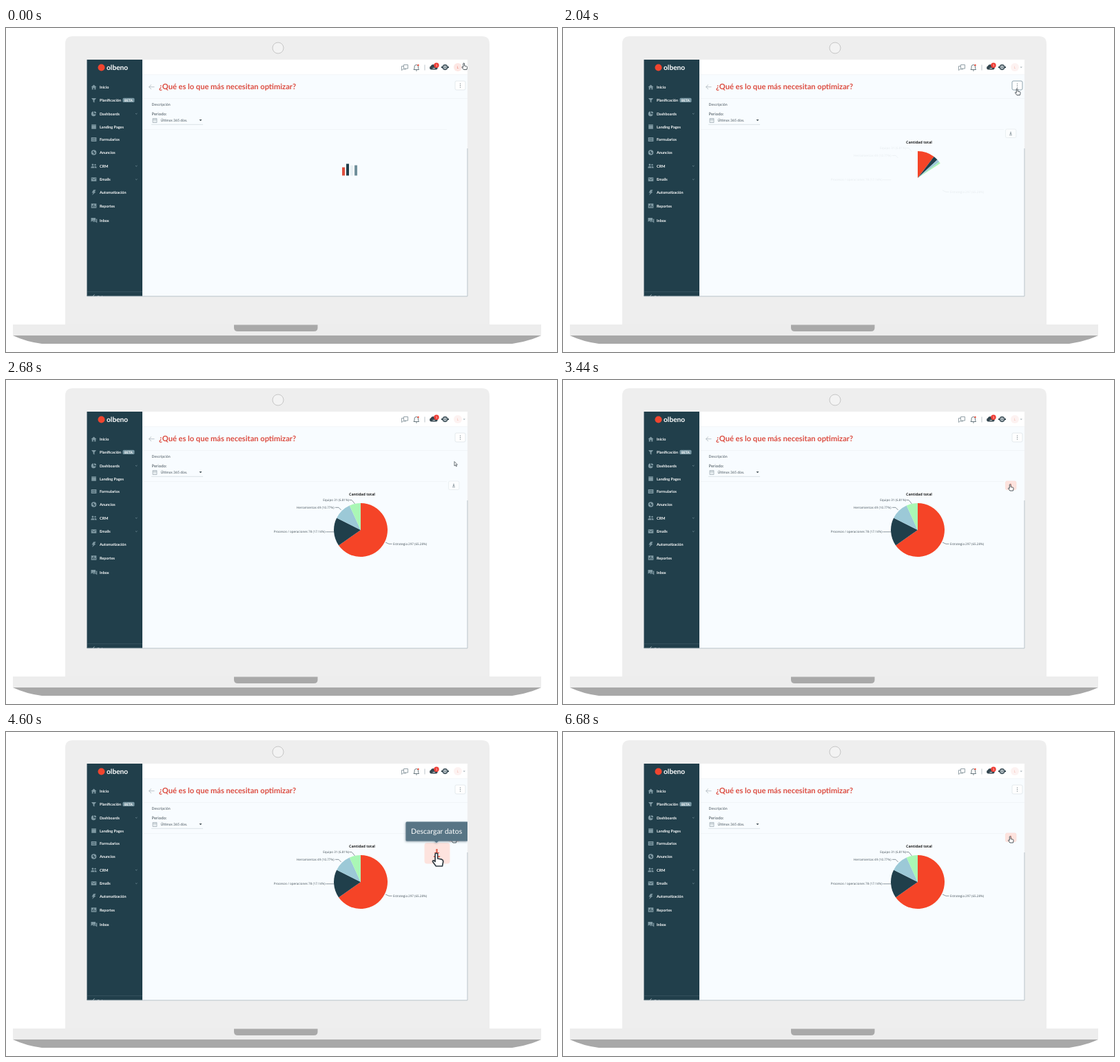
An HTML page for the animation above (6.72 s loop, 800 by 471 pixels).

```html
<!DOCTYPE html>
<html lang="es">
<head>
<meta charset="utf-8">
<title>Panel de reportes</title>
<style>
  html, body { margin: 0; width: 100%; height: 100%; overflow: hidden; background: #fff; }
  svg { display: block; width: 100vw; height: 100vh; text-rendering: geometricPrecision; }
  text { font-family: Lato, "Open Sans", sans-serif; fill: #46535a; }
  #nav text, .brand { fill: #fff; font-weight: 700; font-size: 5.5px; }
  #nav .icon { fill: #7e98a2; fill-rule: evenodd; }
  #chart text { font-family: "Open Sans", sans-serif; font-size: 4.56px; }
  #chart .title { font-size: 5.3px; font-weight: 700; fill: #222; }
  .end { text-anchor: end; }
  .mid { text-anchor: middle; }
  .line { fill: none; stroke: #5d6b73; stroke-width: .7; }
</style>
</head>
<body>
<svg viewBox="0 0 800 471" preserveAspectRatio="none">
  <defs>
    <clipPath id="screen"><rect x="117.5" y="46" width="552.5" height="344"/></clipPath>
    <filter id="shadow" x="-20%" y="-30%" width="140%" height="160%">
      <feDropShadow dx="-.5" dy="1" stdDeviation="1.5" flood-color="#35505e" flood-opacity=".55"/>
    </filter>
    <path id="hand" d="M-2.2-4a.9.9 0 0 1 1.8 0V-1L2.6-.4Q3.8 0 3.6 1.4L3 4.5H-1.6L-4 1.2Q-4 .2-3 .5L-2.2 1.2Z"
      fill="#fff" stroke="#333d44" stroke-width=".85" stroke-linejoin="round"/>
    <path id="arrow" d="M-2-3.5V2.8L-.5 1.5.6 3.8 1.5 3.3.5 1.1H2.4Z" fill="#fff" stroke="#333d44" stroke-width=".7"/>
    <path id="save" d="M-.5-2.6H.5V-.4H1.7L0 1.3-1.7-.4H-.5ZM-2 1.9H2V2.6H-2Z"/>
  </defs>

  <!-- laptop -->
  <path d="M86 431V23Q86 12 97 12H691Q702 12 702 23V431Z" fill="#eee"/>
  <circle cx="395" cy="29" r="8" fill="#f3f3f3" stroke="#c6c6c6"/>
  <path d="M10 431H777V447H10Z" fill="#ededed"/>
  <path d="M10 447H777Q758 456 735 459H52Q29 456 10 447Z" fill="#a8a8a8"/>
  <path d="M331 431.5H452.5V436Q452.5 441 447 441H336.500Q331 441 331 436Z" fill="#a9a9a9"/>

  <g clip-path="url(#screen)">
    <path d="M117 46H671V391H117Z" fill="#f8fcff"/>
    <path d="M198 46H671V68H198Z" fill="#fff"/>
    <path d="M198 67.800H670M198 102.500H670M198 147.500H640" stroke="#eef2f5" stroke-width=".7"/>
    <path d="M117 46H198V391H117Z" fill="#213f4b"/>
    <circle cx="138.500" cy="57.500" r="5" fill="#f0452f"/>
    <text class="brand" x="146" y="61" style="font-size:10.2px">olbeno</text>
    <g id="nav"></g>
    <path d="M118 383.500H198" stroke="#3d5964" stroke-width=".7"/>

    <!-- top bar -->
    <g fill="none" stroke="#7a8b94" stroke-width=".8">
      <path d="M577.500 53.500H583.500V59H577.500ZM577.500 55.500H574.500V61.500L576.500 60H580.500V59"/>
      <path d="M592 60.500H599.500L598.500 58.500V56Q598 53.500 595.800 53.500 593.500 53.500 593 56V58.500ZM595 62H596.800" stroke="#465861"/>
      <path d="M608 53.500V61.500" stroke="#aab4ba"/>
    </g>
    <circle cx="598.500" cy="54" r="1.200" fill="#f04b38"/>
    <path d="M617 60.500A2.700 2.700 0 0 1 616.500 55.500 4.500 4.500 0 0 1 624.500 55.500 2.600 2.600 0 0 1 625 60.500Z" fill="#34464f"/>
    <path d="M619.500 58.500H623" stroke="#fff" stroke-width=".8"/>
    <circle cx="625" cy="54.300" r="3.700" fill="#ee3f37"/>
    <text class="mid" x="625" y="56" font-size="4.500" style="fill:#fff">1</text>
    <circle cx="637.500" cy="57" r="4.300" fill="#52626a"/>
    <path d="M632 57H643" stroke="#34464f" stroke-width="2.200" stroke-dasharray="2 7"/>
    <circle cx="637.500" cy="57" r="2.300" fill="#dce4e8"/>
    <path d="M636 57H639" stroke="#34464f" stroke-width="1.200"/>
    <g id="avatar">
      <circle cx="656" cy="57" r="6" fill="#fde7e4"/>
      <text class="mid" x="656" y="58.800" font-size="5" style="fill:#e8796b">L</text>
    </g>
    <path d="M663.500 56.500H667L665.200 58Z" fill="#98a5ac"/>

    <!-- page heading -->
    <path d="M215.500 85.700H207.500M211 82.500L207.500 85.700 211 89" fill="none" stroke="#b6bfc4" stroke-width=".9"/>
    <text x="222" y="89.300" font-size="11.100" font-weight="700" style="fill:#dc4c40">¿Qué es lo que más necesitan optimizar?</text>
    <rect id="menu" x="652" y="77" width="15" height="13" rx="2" fill="#fff"/>
    <path d="M659.500 80.600v1M659.500 83.100v1M659.500 85.600v1" stroke="#5d6b73"/>
    <text x="211.500" y="113" font-size="5.240">Descripción</text>
    <text x="211.500" y="127" font-size="6">Periodo:</text>
    <path d="M213 131.500H219V137.500H213ZM213 133.300H219" fill="#e7edf0" stroke="#9eabb2" stroke-width=".7"/>
    <text x="224.500" y="136.200" font-size="5.100">Últimos 365 días.</text>
    <path d="M280.500 133H284.500L282.500 135.300Z" fill="#46535a"/>
    <path d="M211 140.300H286" stroke="#cfd7db" stroke-width=".7"/>

    <g id="loader"></g>

    <g id="chart">
      <text class="title mid" x="517" y="168">Cantidad total</text>
      <g id="pie"></g>
      <g id="labels">
        <text class="end" x="498" y="175.500">Equipo 31 (6.81%)</text>
        <text class="end" x="476.500" y="187">Herramientas 49 (10.77%)</text>
        <text class="end" x="463.500" y="222.200">Procesos / operaciones 78 (17.14%)</text>
        <text x="562" y="240">Estrategia 297 (65.28%)</text>
        <path class="line" d="M498.500 174.500H502L506.500 180M478 185.300H483L486.500 189M464.500 220.800H476.500M551 236L556 238.300H560.500"/>
      </g>
      <g id="download">
        <rect x="642.500" y="147" width="15.500" height="12.500" rx="2" stroke-width=".7"/>
        <use href="#save" x="650" y="153.300"/>
      </g>
    </g>

    <use id="cursor"/>

    <g id="zoom">
      <rect x="607.500" y="161" width="37" height="30.500" rx="4" fill="#fde3de"/>
      <use href="#save" transform="translate(625.500 176) scale(2.300)" fill="#e4614f"/>
      <use href="#hand" transform="translate(627.500 186) scale(2)"/>
      <g filter="url(#shadow)">
        <path d="M582 130.500H670V158.500H628L625 161 622 158.500H582Q580.500 158.500 580.500 157V132Q580.500 130.500 582 130.500Z" fill="#587485"/>
      </g>
      <text x="588" y="148" font-size="10.500" style="fill:#fff">Descargar datos</text>
    </g>
  </g>
  <path d="M118 390H670V175" fill="none" stroke="#b9c3c9"/>
</svg>

<script>
const LOOP = 6720;
const $ = id => document.getElementById(id);
const clamp = v => Math.max(0, Math.min(1, v));
const ramp = (t, from, to) => clamp((t - from) / (to - from));
const easeInOut = p => p < .5 ? 4 * p ** 3 : 1 - 4 * (1 - p) ** 3;
const smooth = p => p * p * (3 - 2 * p);
const mix = (a, b, p) => a + (b - a) * p;

// label, baseline centre, icon outline
const items = [
  ['Inicio', 86, 'M-4 0 0-3.5 4 0H2.8V3.5H.8V1H-.8V3.5H-2.8V0Z'],
  ['Planificación', 105, 'M-3.5-3H3.5L.9.3V3.5L-.9 2.5V.3Z'],
  ['Dashboards', 124.5, 'M-.5-3.3A3.5 3.5 0 1 0 3.2.8H-.5ZM.6-3.5V-.4H3.6A3.3 3.3 0 0 0 .6-3.5Z'],
  ['Landing Pages', 143.5, 'M-3.3-3.2H3.3V3.2H-3.3ZM-3.3-1.8H3.3V-1.4H-3.3Z'],
  ['Formularios', 162, 'M-3.8-3H3.8V3H-3.8ZM-2.6-1.5H2.6V-.8H-2.6ZM-2.6.7H2.6V1.4H-2.6Z'],
  ['Anuncios', 181, 'M-3.8 0a3.8 3.8 0 1 0 7.6 0a3.8 3.8 0 1 0-7.6 0ZM-2.6-.6L0-2.6.6 0 2.6.6 0 2.6-.6 0Z'],
  ['CRM', 200.5, 'M-3-1.6a1.4 1.4 0 1 0 2.8 0a1.4 1.4 0 1 0-2.8 0ZM.8-1.6a1.2 1.2 0 1 0 2.4 0a1.2 1.2 0 1 0-2.4 0ZM-4.2 3Q-4.2.6-1.6.6T1 3ZM1.6 3Q1.600 1.400.9.700 4.200.100 4.200 3Z'],
  ['Emails', 220, 'M-3.800-2.800H3.800V2.800H-3.800ZM-3-2L0 .200 3-2V-1.200L0 1-3-1.200Z'],
  ['Automatización', 239, 'M-.5-3.800H3L1-.8H3L-2.500 4-.8.5H-3Z'],
  ['Reportes', 258.5, 'M-3.800-3.200H3.800V3.200H-3.800ZM-2.500-.5H-1.500V2H-2.500ZM-.5-2H.5V2H-.5ZM1.500.3H2.500V2H1.500Z'],
  ['Inbox', 279.5, 'M-4-3.500H2.500V1H-2.500L-4 2.500ZM3.200-2H4.700V4L3.200 2.500H-1.500V1.700H3.200Z']
];
const chevron = y => `<path d="M188 ${y - .5}l1.300 1.200 1.300-1.200" fill="none" stroke="#7e98a2" stroke-width=".7"/>`;

$('nav').innerHTML = items.map(([name, y, icon]) => `
  <path class="icon" d="${icon}" transform="translate(127.5 ${y})"/>
  <text x="136" y="${y + 2}">${name}</text>
  ${['Dashboards', 'CRM', 'Emails'].includes(name) ? chevron(y) : ''}`).join('') + `
  <rect x="169.500" y="101.800" width="17" height="6.200" rx="1.500" fill="#7897a3"/>
  <text class="mid" x="178" y="106.700" style="font-size:4.8px">BETA</text>
  <text x="132" y="393" style="font-size:5.500px;font-weight:400">Colapsar</text>
  <path d="M128.500 387.500l-3 3 3 3" fill="none" stroke="#c4d0d5" stroke-width=".8"/>`;

// x, colour, phase lag in degrees, mean height, swing
const bars = [
  [488, '#de4f3e', 0, 13, 5],
  [494, '#213f4b', 66, 13, 5],
  [500, '#e8f0f4', 80, 12, 3],
  [506, '#708f9b', 90, 13, 2]
];
$('loader').innerHTML = bars.map(([x, c]) => `<rect x="${x}" width="4" fill="${c}"/>`).join('');

const slices = [[297, '#f54427'], [78, '#203f4b'], [49, '#9cc9d7'], [31, '#aaf7b5']];
const total = slices.reduce((sum, [n]) => sum + n, 0);
$('pie').innerHTML = slices.map(([, c]) => `<path fill="${c}"/>`).join('');

const rim = a => `${515 + 39 * Math.sin(a)} ${218 - 39 * Math.cos(a)}`;

function drawPie(grow) {
  let a = 0;
  slices.forEach(([n], i) => {
    const sweep = n / total * grow * 2 * Math.PI;
    $('pie').children[i].setAttribute('d',
      `M515 218L${rim(a)}A39 39 0 ${+(sweep > Math.PI)} 1 ${rim(a + sweep)}Z`);
    a += sweep;
  });
}

function drawLoader(t) {
  bars.forEach(([, , lag, mean, swing], i) => {
    const h = mean + swing * Math.sin((191.5 + t * 258.5 / 960 - lag) * Math.PI / 180);
    const bar = $('loader').children[i];
    bar.setAttribute('y', 214.5 - h);
    bar.setAttribute('height', h);
  });
}

const path = [[0, 666, 56], [1450, 666, 56], [1900, 660.5, 93], [2250, 660.5, 93], [2680, 653, 122], [3250, 650.5, 156.5], [LOOP, 650.5, 156.5]];

function drawCursor(t) {
  const i = path.findIndex(([time]) => time > t);
  const [t0, x0, y0] = path[i - 1], [t1, x1, y1] = path[i];
  const p = smooth(ramp(t, t0, t1));
  const y = mix(y0, y1, p);
  const onTarget = y < 63 || (y > 80 && y < 97) || y > 148;
  $('cursor').setAttribute('href', onTarget ? '#hand' : '#arrow');
  $('cursor').setAttribute('transform', `translate(${mix(x0, x1, p)} ${y})`);
  $('avatar').setAttribute('opacity', y < 63 ? 1 : .5);
  $('menu').setAttribute('stroke', y > 80 && y < 97 ? '#8ea3ad' : '#e4eaed');
  const hover = y > 148;
  const [box, icon] = $('download').children;
  box.setAttribute('fill', hover ? '#fde3de' : '#fbfdfe');
  box.setAttribute('stroke', hover ? '#fbdcd6' : '#e4eaed');
  icon.setAttribute('fill', hover ? '#e4614f' : '#77868e');
}

function drawZoom(t) {
  const p = smooth(ramp(t, 3560, 3840)) * (1 - smooth(ramp(t, 4800, 5060)));
  const s = mix(.42, 1, p);
  $('zoom').setAttribute('opacity', clamp(p * 2));
  $('zoom').setAttribute('transform',
    `translate(${mix(650, 626, p)} ${mix(153, 176, p)}) scale(${s}) translate(-626 -176)`);
}

function frame(now) {
  const t = now % LOOP;
  const loaded = t >= 1700;
  $('loader').style.display = loaded ? 'none' : '';
  $('chart').style.display = loaded ? '' : 'none';
  drawLoader(t);
  drawPie(easeInOut(ramp(t, 1700, 2700)));
  $('labels').setAttribute('opacity', ramp(t, 2000, 2400));
  drawCursor(t);
  drawZoom(t);
}

const start = performance.now();
(function tick() {
  frame(performance.now() - start);
  requestAnimationFrame(tick);
})();
</script>
</body>
</html>
```
